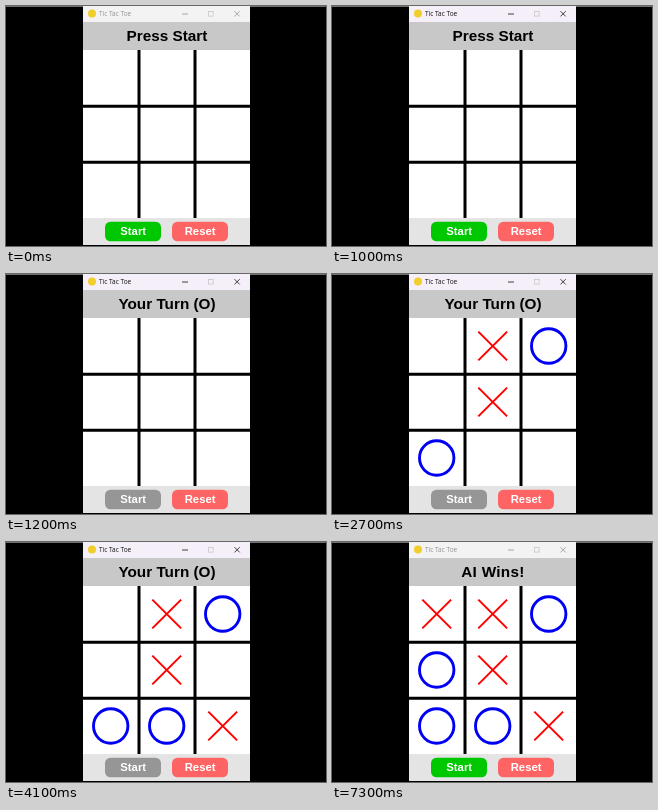
An HTML page that plays this animation: 320 px wide and 240 px high, repeating every 7.4 s.

```html
<!DOCTYPE html>
<html lang="en">
<head>
<meta charset="utf-8">
<title>Tic Tac Toe</title>
<style>
  html, body { margin: 0; width: 100%; height: 100%; overflow: hidden; background: #000; }
  svg { display: block; width: 100vw; height: 100vh; }
  text { font-kerning: normal; }
  .caption { font: 6.5px "Open Sans", "Noto Sans", sans-serif; }
  .bold { font-family: "Liberation Sans", Arial, sans-serif; font-weight: bold; text-anchor: middle; }
  .status { font-size: 15.3px; }
  .button { font-size: 11.3px; fill: #fff; }
</style>
</head>
<body>
<svg viewBox="0 0 320 240">
  <rect width="320" height="240" fill="#000"/>
  <rect width="320" height="1" fill="#707070"/>
  <rect id="bar" x="77" width="167" height="16"/>
  <circle cx="86" cy="7.5" r="4" fill="#f0cf2c"/>
  <g id="chrome">
    <text class="caption" x="93" y="10.2" fill="currentColor">Tic Tac Toe</text>
    <g fill="none" stroke="currentColor" stroke-width=".8">
      <path d="M176 8h6M228.5 5.2l5.2 5.2M233.7 5.2l-5.2 5.2"/>
      <rect x="202.5" y="5.5" width="4.6" height="4.6" stroke="#c8c8c8"/>
    </g>
  </g>
  <rect x="77" y="16" width="167" height="28" fill="#c8c8c8"/>
  <text id="status" class="bold status" x="161" y="35.2"></text>
  <rect x="77" y="44" width="167" height="168" fill="#fff"/>
  <path d="M133 44V212M189 44V212M77 100.3H244M77 156.3H244" stroke="#000" stroke-width="3"/>
  <g id="marks" fill="none"></g>
  <rect x="77" y="212" width="167" height="27" fill="#e4e4e4"/>
  <rect id="start" x="99" y="215.7" width="56" height="19.6" rx="5.5"/>
  <text class="bold button" x="127.2" y="229">Start</text>
  <rect x="166" y="215.7" width="56" height="19.6" rx="5.5" fill="#ff6464"/>
  <text class="bold button" x="194.1" y="229">Reset</text>
</svg>
<script>
  const LOOP = 7400, FOCUS = 800, BLUR = 7300, BEGIN = 1200, END = 5200;
  const CELL = 56;

  // Each round: time, then column and row of the O and of the X that answers it
  const rounds = [
    { at: 1900, o: [0, 2], x: [1, 1] },
    { at: 2700, o: [2, 0], x: [1, 0] },
    { at: 4100, o: [1, 2], x: [2, 2] },
    { at: END, o: [0, 1], x: [0, 0] }
  ];

  const $ = id => document.getElementById(id);
  const center = ([col, row]) => [104.7 + col * CELL, 72 + row * CELL];

  function addMark(parent, d, stroke, width) {
    const path = document.createElementNS("http://www.w3.org/2000/svg", "path");
    path.setAttribute("d", d);
    path.setAttribute("stroke", stroke);
    path.setAttribute("stroke-width", width);
    parent.append(path);
  }

  function addO(parent, cell) {
    const [x, y] = center(cell), r = 17.2;
    addMark(parent, `M${x - r} ${y}a${r} ${r} 0 1 1 ${2 * r} 0a${r} ${r} 0 1 1 ${-2 * r} 0z`, "#0000f5", 2.9);
  }

  function addX(parent, cell) {
    const [x, y] = center(cell), s = 14.4;
    addMark(parent, `M${x - s} ${y - s}l${2 * s} ${2 * s}M${x + s} ${y - s}l${-2 * s} ${2 * s}`, "#f00", 2);
  }

  for (const round of rounds) {
    round.group = document.createElementNS("http://www.w3.org/2000/svg", "g");
    addO(round.group, round.o);
    addX(round.group, round.x);
    $("marks").append(round.group);
  }

  function render(t) {
    const focused = t >= FOCUS && t < BLUR;
    const playing = t >= BEGIN && t < END;
    $("bar").setAttribute("fill", focused ? "#f5eff9" : "#f3f3f3");
    $("chrome").setAttribute("color", focused ? "#111" : "#929292");
    $("status").textContent = t < BEGIN ? "Press Start" : playing ? "Your Turn (O)" : "AI Wins!";
    $("status").setAttribute("letter-spacing", t >= END ? 0.3 : 0);
    $("start").setAttribute("fill", playing ? "#969696" : "#00c800");
    for (const { at, group } of rounds) {
      group.setAttribute("visibility", t >= at ? "visible" : "hidden");
    }
  }

  const origin = performance.now();
  function tick() {
    render((performance.now() - origin) % LOOP);
    requestAnimationFrame(tick);
  }
  tick();
</script>
</body>
</html>
```
